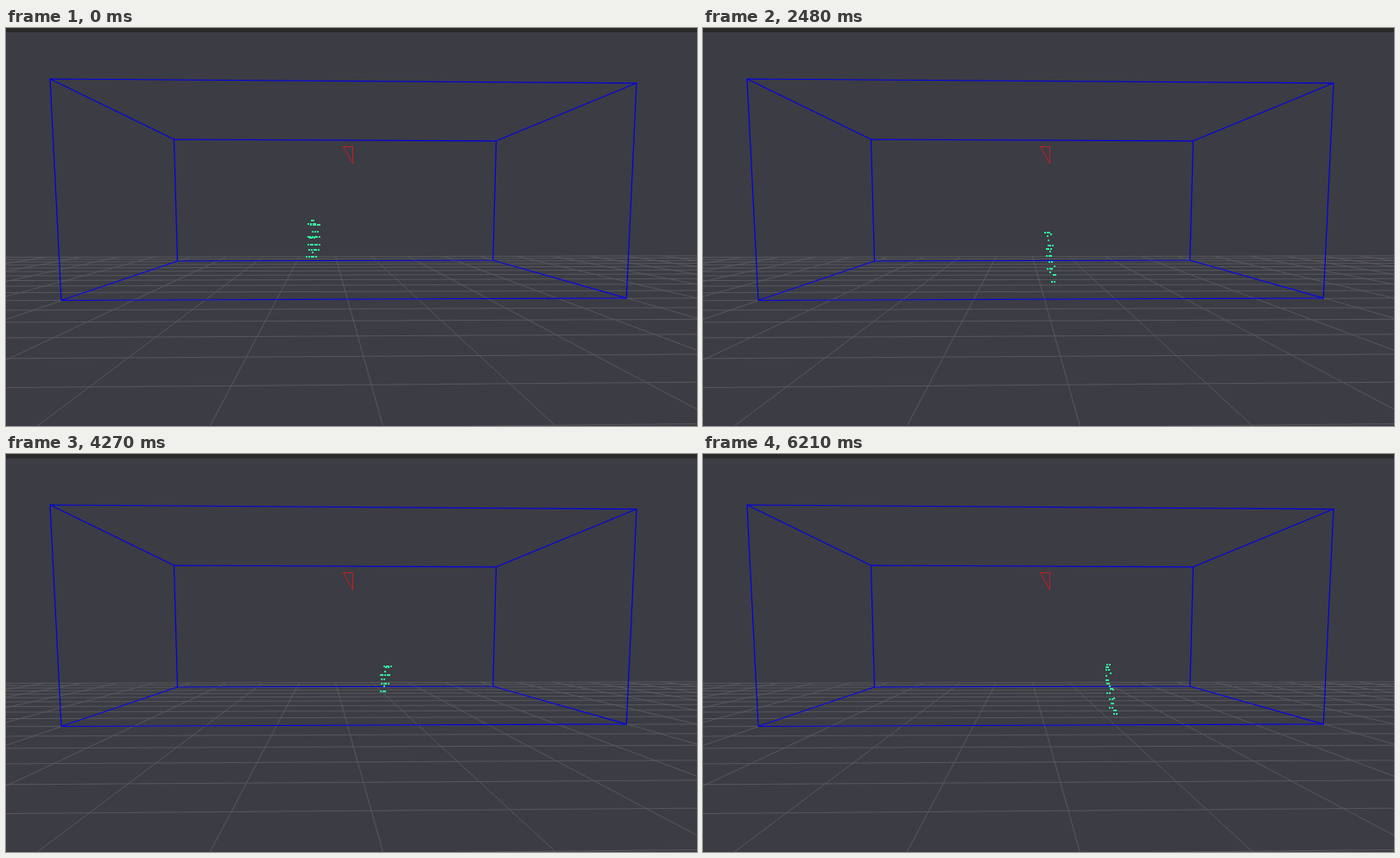
Write an HTML page with a canvas that moves like this. It is 800 by 461 pixels and loops after 6.24 s.

```html
<!DOCTYPE html>
<html lang="en">
<head>
<meta charset="utf-8">
<title>Point cloud in a room</title>
<style>
html, body { margin: 0; width: 100%; height: 100%; overflow: hidden; background: #3c3c44; }
canvas { display: block; width: 800px; height: 461px; }
</style>
</head>
<body>
<canvas id="stage" width="800" height="461"></canvas>
<script>
const ctx = document.getElementById('stage').getContext('2d');
const W = 800, H = 461, LOOP = 6240, SCAN = 90, GAP = 2.6;

// The walking figure: a spine from head to foot, with `rows` of returns
// around it, `run` dots per row on average, scattered sideways by `spread`.
const walk = [
  { t: 0,    head: [354, 219], foot: [355, 268], rows: 10, run: 3.5, spread: 3 },
  { t: 790,  head: [369, 216], foot: [363, 256], rows: 8,  run: 2,   spread: 4 },
  { t: 1700, head: [392, 220], foot: [386, 290], rows: 15, run: 2,   spread: 4 },
  { t: 3210, head: [410, 247], foot: [424, 301], rows: 12, run: 1.4, spread: 2.5 },
  { t: 4270, head: [442, 243], foot: [434, 276], rows: 8,  run: 2.7, spread: 2 },
  { t: 5450, head: [456, 249], foot: [470, 288], rows: 16, run: 2.2, spread: 9 },
  { t: 6210, head: [466, 241], foot: [477, 302], rows: 18, run: 1.4, spread: 4 }
];

const lerp = (a, b, u) => a + (b - a) * u;
const mix = (p, q, u) => p.map((v, i) => lerp(v, q[i], u));

function random(seed) {
  let s = (seed * 7919 + 12345) >>> 0;
  return () => {
    s = (s + 0x6D2B79F5) >>> 0;
    let v = Math.imul(s ^ (s >>> 15), s | 1);
    v ^= v + Math.imul(v ^ (v >>> 7), v | 61);
    return ((v ^ (v >>> 14)) >>> 0) / 4294967296;
  };
}

function path(g, points, color, width, closed) {
  g.beginPath();
  points.forEach(([x, y], i) => i ? g.lineTo(x, y) : g.moveTo(x, y));
  if (closed) g.closePath();
  g.strokeStyle = color;
  g.lineWidth = width;
  g.stroke();
}

function drawGrid(g) {
  const color = '#5b5b60';
  for (let n = 0; n <= 16; n++) {
    const left = 215 + 1 / (0.003975 + 0.001 * n);
    const right = 214 + 1 / (0.0041 + 0.00101 * n);
    path(g, [[-1, left], [W, right]], color, 0.9);
  }
  for (let k = -10; k <= 10; k++) {
    path(g, [[381 + 42 * k, 264.3 - 0.08 * k], [436 + 200.5 * k, H]], color, 0.9);
  }
}

function drawRoom(g) {
  const front = [[50.5, 58.5], [729.5, 63.3], [717.8, 312.3], [63.5, 315]];
  const back = [[194, 128.5], [567, 130.3], [563.3, 268.5], [198, 269.5]];
  const blue = '#0000e4';
  path(g, front, blue, 1.2, true);
  path(g, back, blue, 1.2, true);
  front.forEach((p, i) => path(g, [p, back[i]], blue, 1.2));
}

function drawSensor(g) {
  path(g, [[390, 137], [401, 137], [401, 156.5]], '#c81e22', 1, true);
}

function makeBackdrop() {
  const layer = document.createElement('canvas');
  layer.width = W;
  layer.height = H;
  const g = layer.getContext('2d');
  g.fillStyle = '#3c3c44';
  g.fillRect(0, 0, W, H);
  g.fillStyle = '#2a2a2b';
  g.fillRect(0, 0, W, 5);
  g.translate(0.5, 0.5);
  drawGrid(g);
  drawRoom(g);
  drawSensor(g);
  return layer;
}
const backdrop = makeBackdrop();

function figureAt(t) {
  let i = 0;
  while (i < walk.length - 2 && t >= walk[i + 1].t) i++;
  const a = walk[i], b = walk[i + 1];
  const u = Math.min(1, (t - a.t) / (b.t - a.t));
  return {
    head: mix(a.head, b.head, u),
    foot: mix(a.foot, b.foot, u),
    rows: Math.round(lerp(a.rows, b.rows, u)),
    run: lerp(a.run, b.run, u),
    spread: lerp(a.spread, b.spread, u)
  };
}

function drawCloud(t) {
  const scan = Math.floor(t / SCAN);
  const { head, foot, rows, run, spread } = figureAt(scan * SCAN);
  const rnd = random(scan);
  ctx.fillStyle = '#30f59c';
  for (let r = 0; r < rows; r++) {
    const [cx, cy] = mix(head, foot, Math.pow((r + rnd()) / rows, 1.15));
    const count = 1 + Math.floor(rnd() * (2 * run - 1));
    const x = cx + (rnd() * 2 - 1) * spread - (count - 1) * GAP / 2;
    for (let k = 0; k < count; k++) {
      ctx.fillRect(Math.round(x + k * GAP), Math.round(cy), 2, 2);
    }
  }
}

const start = performance.now();
function frame() {
  const t = (performance.now() - start) % LOOP;
  ctx.drawImage(backdrop, 0, 0);
  drawCloud(t);
  requestAnimationFrame(frame);
}
frame();
</script>
</body>
</html>
```
